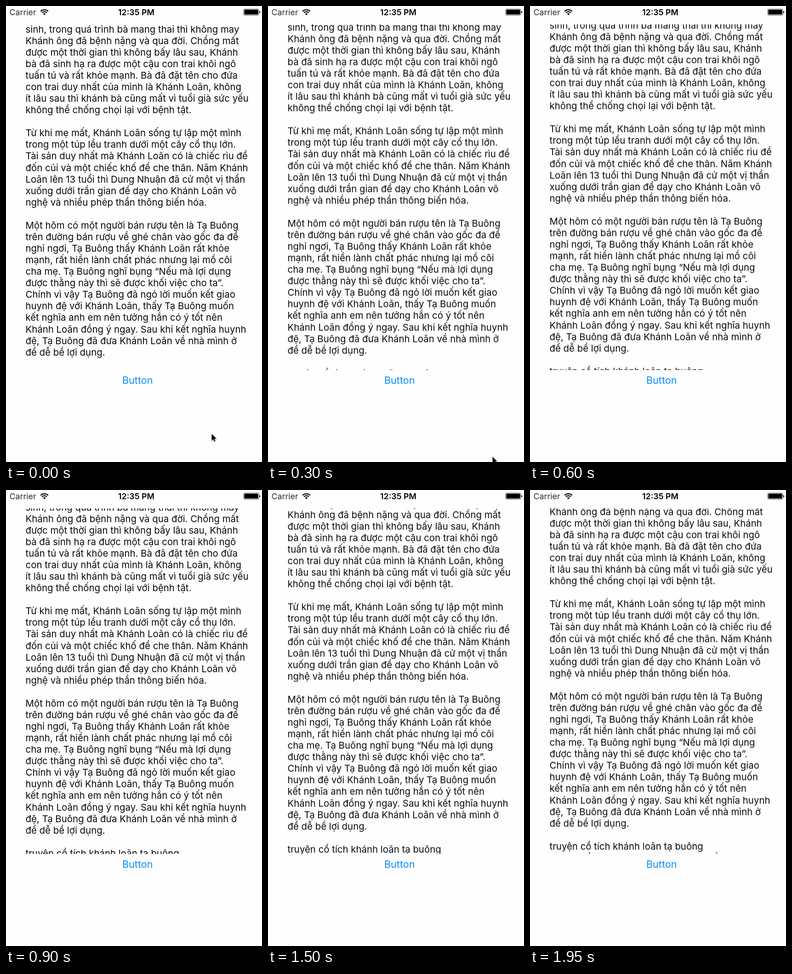
Animation of 557 by 991 pixels, one loop 2050 ms. Source, as an HTML page:

```html
<!DOCTYPE html>
<html lang="vi">
<head>
<meta charset="utf-8">
<title>Scrolling story</title>
<style>
  html, body { margin: 0; width: 100%; height: 100%; overflow: hidden; background: #fefefe; }
  svg { display: block; width: 557px; height: 991px; }
  text { font-family: Inter, "Noto Sans", sans-serif; font-optical-sizing: none; }
  #story text { font-size: 20.4px; fill: #0a0a0a; }
  .status { font-size: 17.8px; }
  .time { font-weight: 600; text-anchor: middle; }
  .button { font-size: 21.6px; fill: #0a8dfb; text-anchor: middle; }
</style>
</head>
<body>
<svg viewBox="0 0 557 991">
  <defs>
    <clipPath id="view"><rect x="0" y="40" width="557" height="750.5"/></clipPath>
  </defs>

  <text class="status" x="7.5" y="20" fill="#2c2c2c">Carrier</text>
  <g fill="none" stroke="#0a0a0a" stroke-width="2.3">
    <path d="M75.3 11.6a11.6 11.6 0 0 1 16.4 0"/>
    <path d="M78.2 14.6a7.5 7.5 0 0 1 10.6 0"/>
  </g>
  <path d="M83.5 20l-3-3.1a4.2 4.2 0 0 1 6 0z" fill="#0a0a0a"/>
  <text class="status time" x="283.5" y="20">12:35 PM</text>
  <rect x="517" y="6.6" width="33" height="13.5" rx="2.4" fill="none" stroke="#0a0a0a" stroke-width=".75"/>
  <rect x="518.5" y="8.1" width="30" height="10.5" rx="1.3"/>
  <path d="M551.2 11q2.2 .6 2.2 2.4t-2.2 2.4z"/>

  <g clip-path="url(#view)"><g id="story"></g></g>
  <text class="button" x="286.2" y="821">Button</text>

  <g id="pointer">
    <path d="M0 0V14.4L3.3 11.3L5.4 16.2L7.8 15.2L5.7 10.5H10.3Z"
          fill="#000" stroke="#fff" stroke-width="1.4" paint-order="stroke"
          style="filter:drop-shadow(0 1px 1px rgba(0,0,0,.35))"/>
  </g>
</svg>
<script>
const LOOP = 2050, STEP = 150, COUNT = 14;
const SCROLL = 2.18;   // px per step
const LEFT = 42.5, BASE = 57.7, LEADING = 25.07;

const lines = `sinh, trong quá trình bà mang thai thì không may
Khánh ông đã bệnh nặng và qua đời. Chồng mất
được một thời gian thì không bấy lâu sau, Khánh
bà đã sinh hạ ra được một cậu con trai khôi ngô
tuấn tú và rất khỏe mạnh. Bà đã đặt tên cho đứa
con trai duy nhất của mình là Khánh Loãn, không
ít lâu sau thì khánh bà cũng mất vì tuổi già sức yếu
không thể chống chọi lại với bệnh tật.

Từ khi mẹ mất, Khánh Loãn sống tự lập một mình
trong một túp lều tranh dưới một cây cổ thụ lớn.
Tài sản duy nhất mà Khánh Loãn có là chiếc rìu để
đốn củi và một chiếc khố để che thân. Năm Khánh
Loãn lên 13 tuổi thì Dung Nhuận đã cử một vị thần
xuống dưới trần gian để dạy cho Khánh Loãn võ
nghệ và nhiều phép thần thông biến hóa.

Một hôm có một người bán rượu tên là Tạ Buông
trên đường bán rượu về ghé chân vào gốc đa để
nghỉ ngơi, Tạ Buông thấy Khánh Loãn rất khỏe
mạnh, rất hiền lành chất phác nhưng lại mồ côi
cha mẹ. Tạ Buông nghĩ bụng “Nếu mà lợi dụng
được thằng này thì sẽ được khối việc cho ta”.
Chính vì vậy Tạ Buông đã ngỏ lời muốn kết giao
huynh đệ với Khánh Loãn, thấy Tạ Buông muốn
kết nghĩa anh em nên tưởng hắn có ý tốt nên
Khánh Loãn đồng ý ngay. Sau khi kết nghĩa huynh
đệ, Tạ Buông đã đưa Khánh Loãn về nhà mình ở
để dễ bề lợi dụng.

truyện cổ tích khánh loãn tạ buông
truyện cổ tích hay cho các bé nghe kể`.split("\n");

const story = document.getElementById("story");
lines.forEach((line, i) => {
  if (!line) return;
  const text = document.createElementNS("http://www.w3.org/2000/svg", "text");
  text.setAttribute("x", LEFT);
  text.setAttribute("y", BASE + i * LEADING);
  text.textContent = line;
  story.append(text);
});

// Holds each pose for one step, then jumps to the next.
function play(id, poseAt) {
  const keys = Array.from({ length: COUNT }, (_, i) => ({
    offset: i * STEP / LOOP,
    transform: poseAt(i),
    easing: "steps(1, end)"
  }));
  keys.push({ offset: 1, transform: poseAt(COUNT - 1) });
  document.getElementById(id).animate(keys, { duration: LOOP, iterations: Infinity });
}

const move = (x, y) => `translate(${x}px, ${y}px)`;
const path = [[447.6, 930], [468, 963], [488.6, 979.6], [493, 986]];
const away = [493, 1020];

play("story", i => move(0, -i * SCROLL));
play("pointer", i => move(...(path[i] || away)));
</script>
</body>
</html>
```
